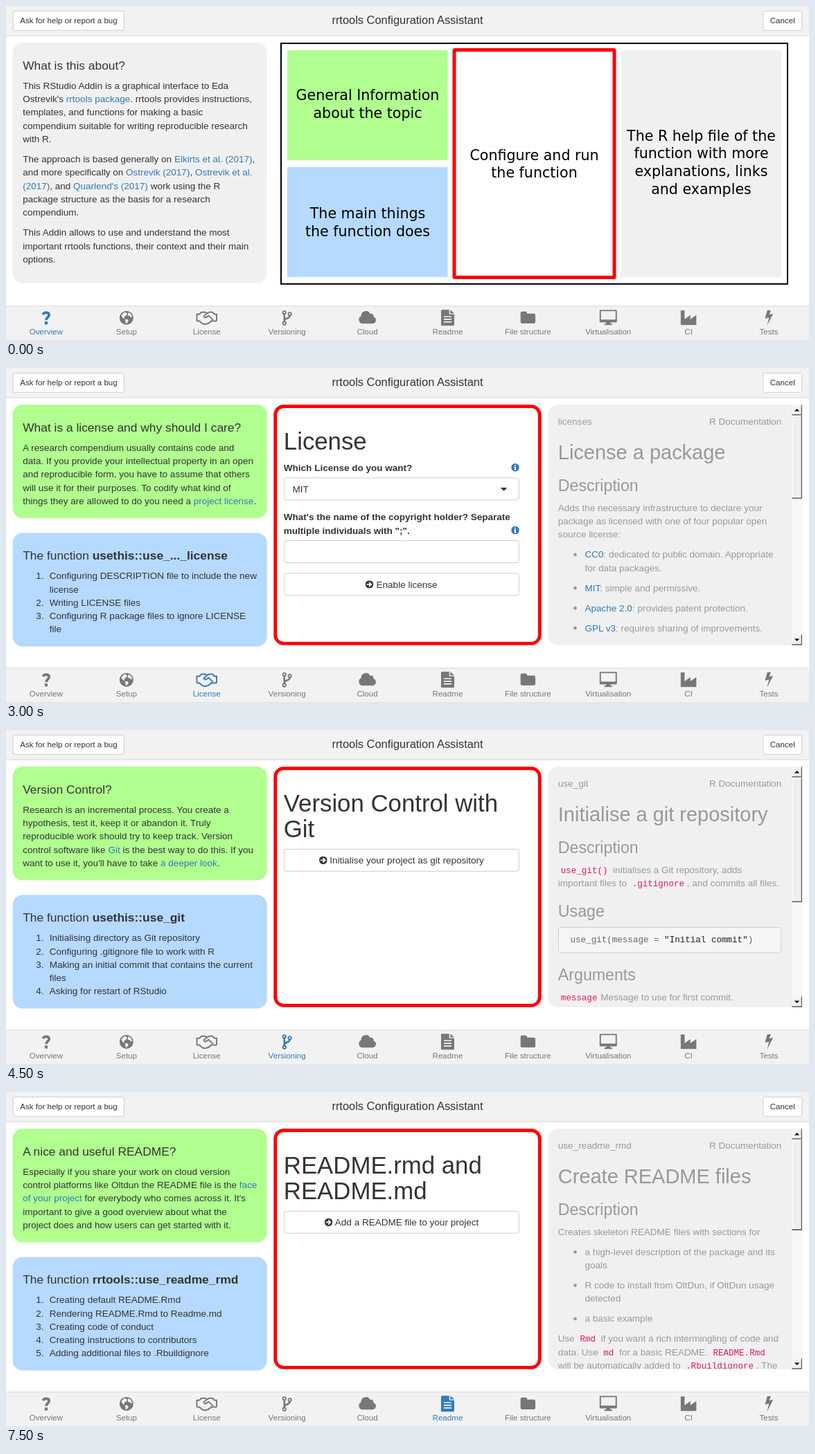
Animation of 1159x483 px, one loop 8 s. Source, as an HTML page:

```html
<!DOCTYPE html>
<html lang="en">
<head>
<meta charset="utf-8">
<title>rrtools Configuration Assistant</title>
<style>
html, body { margin: 0; width: 100%; height: 100%; overflow: hidden; background: #fff; }
#stage { position: absolute; left: 0; top: 0; width: 1200px; height: 500px; overflow: hidden;
  transform: scale(.965833); transform-origin: 0 0; white-space: nowrap;
  font: 14px/20px "Liberation Sans", Arial, sans-serif; color: #333; }
#stage * { box-sizing: border-box; }
header { position: absolute; width: 1200px; height: 45px; background: #f2f2f2;
  border-bottom: 1px solid #d6d6d6; text-align: center; font-size: 17px; line-height: 44px; }
header span { position: absolute; top: 7px; height: 30px; padding: 0 10px; background: #fff;
  border: 1px solid #ccc; border-radius: 3px; font-size: 12px; line-height: 28px; }
#nav, #map { position: absolute; left: 0; top: 0; width: 1200px; height: 500px; }
#nav g { color: #777; }
#nav g.on { color: #337ab7; }
.scene { visibility: hidden; }
.scene.on { visibility: visible; }
.scene > div { position: absolute; }
.card { left: 10px; width: 380px; height: 170px; padding: 15px; border-radius: 15px; }
.about { top: 55px; background: #b0ff8f; }
.does { top: 247px; background: #b5d9ff; }
.intro { top: 55px; height: 360px; background: #f0f0f0; }
h1, h2, h3, h4 { margin: 20px 0 10px; font-weight: normal; }
h1 { font-size: 36px; line-height: 39px; }
h2 { font-size: 30px; line-height: 33px; }
h3 { font-size: 24px; line-height: 26px; }
h4 { font-size: 18px; line-height: 19px; margin: 10px 0; }
p { margin: 0 0 10px; }
a { color: #337ab7; }
ol, ul { list-style: none; margin: 0 0 10px; padding-left: 40px; counter-reset: n; }
li { position: relative; }
ol li::before { counter-increment: n; content: counter(n) "."; position: absolute;
  left: -40px; width: 31.5px; text-align: right; }
ul li { margin-bottom: 10px; }
ul li::before { content: ""; position: absolute; left: -17px; top: 8px; width: 5px; height: 5px;
  border-radius: 50%; background: #999; }
.mid { left: 400px; top: 55px; width: 400px; height: 360px; background: #fff;
  border: 5px solid #f00; border-radius: 15px; }
.form { position: absolute; left: 10px; top: 10px; width: 370px; height: 330px;
  padding-right: 18px; overflow: hidden; }
.form.slim { padding-right: 34px; }
label { display: block; position: relative; font-weight: bold; margin-bottom: 5px; }
label.tight { margin-bottom: 0; }
.info { position: absolute; right: 0; bottom: 4px; width: 12px; height: 12px; }
.field { position: relative; height: 34px; margin-bottom: 15px; padding: 0 12px;
  border: 1px solid #ccc; border-radius: 4px; line-height: 32px; background: #fff; }
.pick::after { content: ""; position: absolute; right: 17px; top: 14px;
  border: 5px solid transparent; border-top-color: #333; border-bottom: 0; }
.btn { text-align: center; }
.btn svg { width: 12px; height: 12px; vertical-align: -1px; margin-right: 4px; }
.small { width: 149px; margin: 0; }
.red { color: #f00; }
.doc { left: 810px; top: 55px; width: 380px; height: 360px; padding: 15px; overflow: hidden;
  background: #f0f0f0; border-radius: 15px 0 0 15px; color: #999; }
.doc .view { position: absolute; left: 15px; top: 15px; right: 31px; bottom: 0; overflow: hidden; }
.doc.short .view { bottom: 16px; }
.topic { display: flex; justify-content: space-between; }
code, pre { font: 13px/18px "Liberation Mono", "Courier New", monospace; }
code { padding: 2px 4px; border-radius: 4px; color: #c7254e; background: #f5eff1; line-height: 14px; }
pre { margin: 0 0 10px; height: 39px; padding: 9.5px; border: 1px solid #ccc; border-radius: 4px;
  background: #f5f5f5; color: #666; }
pre b { font-weight: normal; color: #222; }
.bar { position: absolute; display: flex; background: #f7f7f7; }
.bar.v { flex-direction: column; width: 16px; }
.bar.h { height: 16px; }
.bar b { flex: none; width: 16px; height: 16px; background: #efefef;
  box-shadow: inset -1px -1px #404040, inset 1px 1px #efefef, inset -2px -2px #a0a0a0, inset 2px 2px #fff; }
.bar b:last-child { margin: auto 0 0 auto; }
.bar i { display: block; width: 8px; height: 4px; margin: 6px 4px; background: #000;
  clip-path: polygon(0 100%, 50% 0, 100% 100%); }
.v b:last-child i { transform: rotate(180deg); }
.h i { transform: rotate(-90deg); }
.h b:last-child i { transform: rotate(90deg); }
</style>
</head>
<body>
<div id="stage">
  <header>rrtools Configuration Assistant
    <span style="left:10px">Ask for help or report a bug</span><span style="right:10px">Cancel</span>
  </header>
  <main id="scenes"></main>
  <svg id="nav" viewBox="0 0 1159 483" preserveAspectRatio="none"></svg>
</div>
<script>
const STEP = 1500, LOOP = 8000;
const $ = id => document.getElementById(id);

const info = '<svg class="info" viewBox="0 0 12 12"><circle cx="6" cy="6" r="6" fill="#337ab7"/>' +
  '<path d="M5 2h2v1.6H5zM4.2 4.8H7v3.6h.8v1.4H4.2V8.4H5V6.2h-.8z" fill="#fff"/></svg>';
const arrow = '<svg viewBox="0 0 12 12"><circle cx="6" cy="6" r="6" fill="#333"/>' +
  '<path d="M2 6h6.5M5.6 2.7 8.9 6 5.6 9.3" fill="none" stroke="#fff" stroke-width="1.8"/></svg>';
const folder = '<svg viewBox="0 0 12 12" style="width:13px"><path fill="#333" ' +
  'd="M0 2q0-1 1-1h3q1 0 1 1v.5h6q1 0 1 1V10q0 1-1 1H1q-1 0-1-1z"/></svg>';

const label = (text, mark = '', cls = '') => `<label class="${cls}">${text}${mark}</label>`;
const input = '<div class="field"></div>';
const pick = text => `<div class="field pick">${text}</div>`;
const button = text => `<div class="field btn">${arrow}${text}</div>`;
const list = (tag, items) => `<${tag}>${items.map(t => `<li>${t}</li>`).join('')}</${tag}>`;
const code = text => `<code>${text}</code>`;

function bar(dir, left, top, len, thumb) {
  const side = dir === 'v' ? 'height' : 'width', end = '<b><i></i></b>';
  return `<div class="bar ${dir}" style="left:${left}px;top:${top}px;${side}:${len}px">` +
    `${end}<b style="${side}:${thumb}px"></b>${end}</div>`;
}

function page({ title, about, fn, does, form, slim, topic, doc, thumb, wide }) {
  return `<div class="card about"><h4>${title}</h4><p>${about}</p></div>
    <div class="card does"><h4>The function <b>${fn}</b></h4>${list('ol', does)}</div>
    <div class="mid"><div class="form ${slim ? 'slim' : ''}">${form}${slim ? bar('v', 354, 0, 330, slim) : ''}</div></div>
    <div class="doc ${wide ? 'short' : ''}"><div class="view">
      <div class="topic"><span>${topic}</span><span>R Documentation</span></div>${doc}</div>
      ${bar('v', 364, 0, wide ? 344 : 360, thumb)}${wide ? bar('h', 0, 344, 364, wide) : ''}</div>`;
}

function lines(x, y, rows) {
  return rows.map((t, i) => `<text x="${x}" y="${y + i * 25.75}">${t}</text>`).join('');
}

const overview = `<div class="card intro"><h4>What is this about?</h4>
  <p>This RStudio Addin is a graphical interface to Eda<br>Ostrevik's <a>rrtools package</a>. rrtools provides instructions,<br>templates, and functions for making a basic<br>compendium suitable for writing reproducible research<br>with R.</p>
  <p>The approach is based generally on <a>Elkirts et al. (2017)</a>,<br>and more specifically on <a>Ostrevik (2017)</a>, <a>Ostrevik et al.<br>(2017)</a>, and <a>Quarlend's (2017)</a> work using the R<br>package structure as the basis for a research<br>compendium.</p>
  <p>This Addin allows to use and understand the most<br>important rrtools functions, their context and their main<br>options.</p></div>
  <svg id="map" viewBox="0 0 1159 483" preserveAspectRatio="none" font-family="DejaVu Sans, sans-serif" font-size="20.6" text-anchor="middle" fill="#000">
  <rect x="397" y="54" width="731" height="348" fill="#fff" stroke="#000" stroke-width="2"/>
  <rect x="406" y="64" width="231.5" height="159" fill="#b0ff8f"/>
  <rect x="406" y="233" width="231.5" height="159" fill="#b5d9ff"/>
  <rect x="887.5" y="64" width="231.5" height="328" fill="#f0f0f0"/>
  <rect x="647" y="63.5" width="231" height="329" rx="1" fill="#fff" stroke="#f00" stroke-width="5"/>
  ${lines(522, 136, ['General Information', 'about the topic'])}
  ${lines(522, 307.2, ['The main things', 'the function does'])}
  ${lines(762.5, 222.8, ['Configure and run', 'the function'])}
  ${lines(1003.5, 194.8, ['The R help file of the', 'function with more', 'explanations, links', 'and examples'])}</svg>`;

const pages = [
  {
    title: 'A new project!',
    about: 'Each reproducible research project lives in an own<br>directory on your computer. This directory needs some<br>special files and subfolders to work as an <a>R package</a>.<br>The first step in the creation of a research compendium<br>is to create and configure all of this.',
    fn: 'rrtools::use_compendium',
    does: ['Creating project directory', 'Creating R package directories', 'Writing and Preconfiguring R package files', 'Opening project in RStudio'],
    form: '<h1>Create a research<br>compendium</h1>' + label('Select the parent directory of the new project:', '', 'tight') +
      `<div class="field btn small">${folder}Choose directory</div>` + label('Set a project name:', info) + input +
      label('The new project will be created here:', '', 'tight') + '<div class="red">not yet definded</div>' +
      label('Should an RStudio Project file be created?', info) + pick('Yes'),
    slim: 206,
    topic: 'use_compendium',
    doc: '<h2>Creates an R package<br>suitable to use as a<br>research compendium,<br>and switches to the<br>working directory of this<br>new package, ready to<br>work</h2><h3>Description</h3><p>This is usethis::create_package() with some</p>',
    thumb: 117
  }, {
    title: 'What is a license and why should I care?',
    about: 'A research compendium usually contains code and<br>data. If you provide your intellectual property in an open<br>and reproducible form, you have to assume that others<br>will use it for their purposes. To codify what kind of<br>things they are allowed to do you need a <a>project license</a>.',
    fn: 'usethis::use_..._license',
    does: ['Configuring DESCRIPTION file to include the new<br>license', 'Writing LICENSE files', 'Configuring R package files to ignore LICENSE<br>file'],
    form: '<h1>License</h1>' + label('Which License do you want?', info) + pick('MIT') +
      label('What\'s the name of the copyright holder? Separate<br>multiple individuals with ";".', info) + input + button('Enable license'),
    topic: 'licenses',
    doc: '<h2>License a package</h2><h3>Description</h3><p>Adds the necessary infrastructure to declare your<br>package as licensed with one of four popular open<br>source license:</p>' +
      list('ul', ['<a>CC0</a>: dedicated to public domain. Appropriate<br>for data packages.', '<a>MIT</a>: simple and permissive.', '<a>Apache 2.0</a>: provides patent protection.', '<a>GPL v3</a>: requires sharing of improvements.']) +
      '<p>See <a>https://choosealicense.com</a> for more details and</p>',
    thumb: 125
  }, {
    title: 'Version Control?',
    about: 'Research is an incremental process. You create a<br>hypothesis, test it, keep it or abandon it. Truly<br>reproducible work should try to keep track. Version<br>control software like <a>Git</a> is the best way to do this. If you<br>want to use it, you\'ll have to take <a>a deeper look</a>.',
    fn: 'usethis::use_git',
    does: ['Initialising directory as Git repository', 'Configuring .gitignore file to work with R', 'Making an initial commit that contains the current<br>files', 'Asking for restart of RStudio'],
    form: '<h1>Version Control with<br>Git</h1>' + button('Initialise your project as git repository'),
    topic: 'use_git',
    doc: `<h2>Initialise a git repository</h2><h3>Description</h3><p>${code('use_git()')} initialises a Git repository, adds<br>important files to ${code('.gitignore')}, and commits all files.</p>
      <h3>Usage</h3><pre> use_git(message = <b>"Initial commit"</b>)</pre><h3>Arguments</h3><p>${code('message')}<span style="margin-left:1px">Message to use for first commit.</span></p>`,
    thumb: 187
  }, {
    title: 'A remote git repository?',
    about: 'If you\'re using Git to track the progress of your work,<br>then you can link it to a web platform like <a>Oltdun</a>, <a>OfiLun</a><br>or <a>Siltdoven</a>. You should do this to make your work<br>available for everybody. The Websites also have good<br>code management and community tools.',
    fn: 'rrtools::use_oltdun',
    does: ['Creating OltDun repository', 'Linking local project to Oltdun repository', 'Adding OltDun links to R Package<br>DESCRIPTION', 'Pushing local data to OltDun'],
    form: '<h1>Git Cloud Plaform:<br>OltDun</h1>' + label('Your personal OltDun access token:', info) + input +
      label('Should your repository be private?', info) + pick('No') + button('Connect your local repo with OltDun'),
    topic: 'use_oltdun',
    doc: `<h2>Connect a local repo<br>with OltDun</h2><h3>Description</h3><p>${code('use_oltdun()')} takes a local project, creates an<br>associated repo on OltDun, adds it to your local repo<br>as the ${code('origin')} remote, and makes an initial push to<br>synchronize. ${code('use_oltdun()')} requires that your<br>project already be a Git repository, which you can<br>accomplish with ${code('use_git()')}, if needed.</p>
      <p>${code('use_oltdun_links()')} populates the ${code('URL')} and<br>${code('BugReports')} fields of a OltDun-using R package</p>`,
    thumb: 47, wide: 321
  }, {
    title: 'A nice and useful README?',
    about: 'Especially if you share your work on cloud version<br>control platforms like Oltdun the README file is the <a>face<br>of your project</a> for everybody who comes across it. It\'s<br>important to give a good overview about what the<br>project does and how users can get started with it.',
    fn: 'rrtools::use_readme_rmd',
    does: ['Creating default README.Rmd', 'Rendering README.Rmd to Readme.md', 'Creating code of conduct', 'Creating instructions to contributors', 'Adding additional files to .Rbuildignore'],
    form: '<h1>README.rmd and<br>README.md</h1>' + button('Add a README file to your project'),
    topic: 'use_readme_rmd',
    doc: '<h2>Create README files</h2><h3>Description</h3><p>Creates skeleton README files with sections for</p>' +
      list('ul', ['a high-level description of the package and its<br>goals', 'R code to install from OltDun, if OltDun usage<br>detected', 'a basic example']) +
      `<p>Use ${code('Rmd')} if you want a rich intermingling of code and<br>data. Use ${code('md')} for a basic README. ${code('README.Rmd')}<br>will be automatically added to ${code('.Rbuildignore')}. The</p>`,
    thumb: 136
  }
];

const solid = d => `<path d="${d}" fill="currentColor"/>`;
const cut = d => `<path d="${d}" fill="#f2f2f2"/>`;
const line = (d, w, color = 'currentColor') =>
  `<path d="${d}" fill="none" stroke="${color}" stroke-width="${w}" stroke-linejoin="round"/>`;
const ring = (x, y) => `<circle cx="${x}" cy="${y}" r="2.2" fill="none" stroke="currentColor" stroke-width="1.8"/>`;

const tabs = [
  ['Overview', line('M-4.6-4.8C-2.6-8.8 4.2-8.2 4.2-4C4.2-.8 0-.6 0 3.4', 3.8) + solid('M-2.1 5.4h4.2v4.2h-4.2z')],
  ['Setup', '<circle r="10" fill="currentColor"/>' +
    cut('M-7.5-3.5-3.5-7.8 0-7.5 1-5.5-1-3-3.5-1.5-2.5.8-4 1.2-6.2-1z') +
    cut('M3-8 6.2-6 8.4-1.5 6.5-.5 4.5-3 2-2.5 2-5z') + cut('M-2 2 1.2 2.2 3 4 .5 8.2-1.2 7.6z')],
  ['License', line('M-14.3-5.2h3.6l3.2-3h4.8L.8-6.6 4-8.2h4.2l3 3h3.1M-14.3-6v10.6M14.3-6v10.6M-14.3 4.6h3.6l4.6 4q1.4 1 3 .3 2 1.2 3.7-.6 2.6.3 3-1.7 2.6 0 2.4-2h8.3M.8-6.6-4.2-2.6q.8 4 5 .8l2-1.2 6.2 6', 1.9)],
  ['Versioning', ring(-3.9, -7.6) + ring(-3.9, 7.8) + ring(4, -5.6) + line('M-3.9-5V5.2M4-3.2c0 5-7.4 3-7.9 7', 2.5)],
  ['Cloud', solid('M-7.5 8.3A5.6 5.6 0 0 1-9-2.3 6.9 6.9 0 0 1 4-6 4 4 0 0 1 9-1.4 5 5 0 0 1 7.8 8.3z')],
  ['Readme', solid('M-9.5-10.5q0-1.2 1.2-1.2H2.2v6.6H9.5v15.2q0 1.2-1.2 1.2H-8.3q-1.2 0-1.2-1.2zM3.8-11.7 9.5-6.4H3.8z') +
    line('M-5.6-1.6H5.6M-5.6 2.2H5.6M-5.6 6H5.6', 1.6, '#f2f2f2')],
  ['File structure', solid('M-10.7-6.8q0-2.4 2.4-2.4h4.6q2.4 0 2.4 2.4v.6h9.6q2.4 0 2.4 2.4v9.6q0 2.4-2.4 2.4H-8.3q-2.4 0-2.4-2.4z')],
  ['Virtualisation', line('M-11.5-10.5h23V5.6h-23z', 1.9) + solid('M-12 2.6h24v3.6h-24zM-2.6 6h5.2l.6 2.4h2.4v2H-5.6v-2h2.4z')],
  ['CI', solid('M-11.3 10.3V-10.6h5.6V2.2L2.6-3.8v6l8.6-6v14.1z')],
  ['Tests', solid('M-2.2-11h5L.6-4.6 6.2-6-2.6 11 .3-.4-5.6 1z')]
];

$('nav').innerHTML = '<path d="M0 434H1159V483H0z" fill="#f2f2f2"/><path d="M0 434H1159" stroke="#d6d6d6"/>' +
  tabs.map(([name, icon], i) => `<g transform="translate(${57.95 + 115.9 * i} 451)">${icon}
    <text y="23.6" text-anchor="middle" font-size="11.59" fill="currentColor">${name}</text></g>`).join('');
$('scenes').innerHTML = [overview, ...pages.map(page)].map(h => `<section class="scene">${h}</section>`).join('');

const scenes = document.querySelectorAll('.scene'), marks = document.querySelectorAll('#nav g');
const start = performance.now();
let shown = -1;

function draw() {
  const now = Math.floor((performance.now() - start) % LOOP / STEP);
  if (now !== shown) {
    shown = now;
    scenes.forEach((s, i) => s.classList.toggle('on', i === now));
    marks.forEach((g, i) => g.classList.toggle('on', i === now));
  }
  requestAnimationFrame(draw);
}
draw();
</script>
</body>
</html>
```
